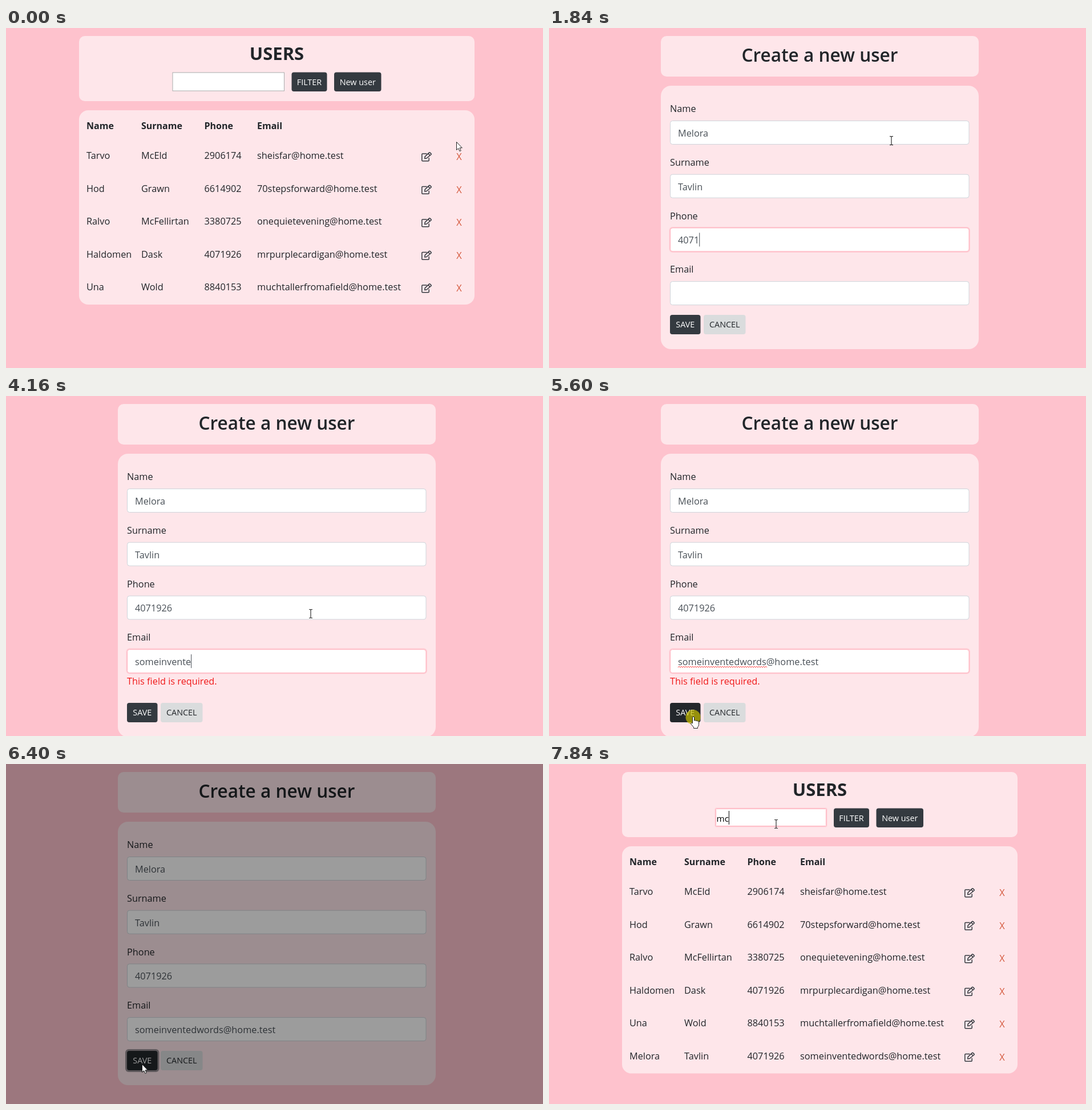
Animation of 941x595 px, one loop 8000 ms. Source, as an HTML page:

```html
<!DOCTYPE html>
<html lang="en">
<head>
<meta charset="utf-8">
<title>Users</title>
<style>
html, body { margin: 0; width: 100%; height: 100%; overflow: hidden; background: #fec2cd; }
svg { display: block; width: 100vw; height: 100vh; }
text { font: 16.3px "Open Sans", sans-serif; fill: #212529; white-space: pre; }
.head { font-weight: 700; font-size: 16px; }
.title { font-weight: 600; font-size: 31.6px; text-anchor: middle; }
.bold { font-weight: 700; font-size: 31px; }
.button { font-size: 14.4px; text-anchor: middle; }
.white { fill: #fff; }
.value { fill: #495057; }
.query { font-size: 15.2px; fill: #000; }
.error { fill: #f01818; }
.remove { fill: #d4573b; text-anchor: middle; }
.key { font: 700 70px "Liberation Sans", sans-serif; text-anchor: middle; fill: #000; }
</style>
</head>
<body>
<svg id="stage" viewBox="0 0 941 595"></svg>
<script>
const LOOP = 8000, STEP = 40, PITCH = 93.7, ERROR_HEIGHT = 35;
const stage = document.getElementById('stage');
const pen = document.createElement('canvas').getContext('2d');

const newUser = ['Melora', 'Tavlin', '4071926', 'someinventedwords@home.test'];
const users = [
  ['Tarvo', 'McEld', '2906174', 'sheisfar@home.test'],
  ['Hod', 'Grawn', '6614902', '70stepsforward@home.test'],
  ['Ralvo', 'McFellirtan', '3380725', 'onequietevening@home.test'],
  ['Haldomen', 'Dask', '4071926', 'mrpurplecardigan@home.test'],
  ['Una', 'Wold', '8840153', 'muchtallerfromafield@home.test'],
  newUser
];
const fields = ['Name', 'Surname', 'Phone', 'Email'];
const columns = [141, 237, 347.5, 440];

// Pointer: [time, x, y]
const path = [
  [40, 789, 199], [200, 615, 95], [280, 615, 95], [440, 621, 178],
  [1800, 621, 178], [2080, 242, 522], [2160, 242, 522], [2480, 534, 381],
  [5240, 534, 381], [5520, 253, 561], [5640, 253, 561], [5760, 238, 525],
  [7120, 238, 525], [7560, 398, 105]
];
const pointerKinds = [
  [0, 'arrow'], [160, 'hand'], [280, 'arrow'], [400, 'beam'], [1880, 'arrow'],
  [2040, 'hand'], [2200, 'arrow'], [2440, 'beam'], [5320, 'arrow'],
  [5440, 'hand'], [6240, 'arrow'], [7520, 'beam']
];
const clicks = [[200, 280], [400, 440], [2080, 2160], [2480, 2560], [5560, 5680], [6160, 6240], [7560, 7640]];
const focusTimes = [[0, -1], [440, 0], [720, 1], [1360, 2], [2120, -1], [2520, 2], [3160, 3], [5640, -1]];
const caretGaps = [[2600, 2760], [3400, 3560], [5240, 5640]];

const clamp = (v, lo, hi) => Math.min(hi, Math.max(lo, v));
const within = (t, [from, to]) => t >= from && t < to;
const latest = (list, t) => list.filter(([from]) => from <= t).pop()[1];
// Number of characters typed at an even pace; the first lands at `from`, the last at `to`.
const count = (t, from, to, n) => clamp(Math.floor((t - from) / (to - from) * (n - 1) + 1e-6) + 1, 0, n);

function width(string, size = 16.3) {
  pen.font = `${size}px "Open Sans", sans-serif`;
  return pen.measureText(string).width;
}

const text = (x, y, string, cls = '') => `<text x="${x}" y="${y}" class="${cls}">${string}</text>`;
const rect = (x, y, w, h, r, fill, extra = '') =>
  `<rect x="${x}" y="${y}" width="${w}" height="${h}" rx="${r}" fill="${fill}" ${extra}/>`;
const panel = (x, y, w, h, r) => rect(x, y, w, h, r, '#fee6ea');
const caret = (x, y, color) => rect(x, y, 1, 24, 0, color);

function button(x, y, w, h, label, fill, cls = 'white') {
  return rect(x, y, w, h, 4, fill) + text(x + w / 2, y + h / 2 + 5.4, label, 'button ' + cls);
}

function input(x, y, w, h, focused, border = '#ced4da', r = 4) {
  const glow = focused ? rect(x - 1, y - 1, w + 2, h + 2, r + 1, 'none', 'stroke="#ffb6c1" stroke-width="2" opacity=".5"') : '';
  return glow + rect(x, y, w, h, r, '#fff', `stroke="${focused ? '#ffb0bc' : border}"`);
}

function editIcon(x, y) {
  return `<path transform="translate(${x} ${y})" fill="none" stroke="#343a40" stroke-width="1.5" d="M.5-5.2H-7q-1.2 0-1.2 1.2V6.3q0 1.2 1.2 1.2H3q1.2 0 1.2-1.2V2M-3.2 3l.3-3.1L4.4-7.2q.8-.8 1.6 0l1.8 1.8q.8.8 0 1.6L-.1 2.7zM2.8-5.6l3.4 3.4"/>`;
}

function listPage(t, rowCount) {
  const focused = t >= 7600, shift = focused ? -1.5 : 0;
  const query = 'mc'.slice(0, count(t, 7800, 7840, 2));
  let out = panel(128, 14, 693, 114, 10) + panel(128, 144, 693, 52.5 + 57.5 * rowCount, 16)
    + text(474.5, 56, 'USERS', 'title bold')
    + (focused ? input(292.5, 78.5, 193, 30, true, '', 1) : input(292, 78, 195.5, 32, false, '#a9adad', 0))
    + button(500.5 + shift, 77.5, 62, 33.5, 'FILTER', '#343a40')
    + button(575 + shift, 77.5, 82.5, 33.5, 'New user', '#343a40');
  if (focused) out += text(293.5, 101, query, 'query') + caret(293.5 + width(query, 15.2), 82, '#000');
  fields.forEach((name, i) => out += text(columns[i], 177, name, 'head'));
  users.slice(0, rowCount).forEach((user, row) => {
    const y = 229.3 + 57.5 * row;
    user.forEach((value, i) => out += text(columns[i], y, value));
    out += editIcon(737, y - 4) + text(794, y + 2, 'X', 'remove');
  });
  return out;
}

function formPage(t, pointer) {
  const focus = latest(focusTimes, t);
  const lengths = [
    count(t, 480, 680, 6),
    count(t, 840, 920, 2) + count(t, 1080, 1200, 4),
    count(t, 1480, 1640, 4) + count(t, 2880, 3000, 3),
    count(t, 3560, 4280, 13) + count(t, 4400, 4520, 4) + count(t, 4680, 5080, 10)
  ];
  const errors = {};
  if (within(t, [2120, 3000])) errors[2] = 'Please enter a valid phone number';
  if (within(t, [2120, 5640])) errors[3] = 'This field is required.';
  const extra = ERROR_HEIGHT * Object.keys(errors).length;

  let out = panel(196, 14, 557, 71, 10) + panel(196, 101, 557, 461 + extra, 18)
    + text(474.5, 59, 'Create a new user', 'title');
  let offset = 0;
  fields.forEach((name, i) => {
    const y = PITCH * i + offset, value = newUser[i].slice(0, lengths[i]);
    out += text(212, 147.3 + y, name) + input(212.5, 162.5 + y, 523.5, 41, focus === i)
      + text(226, 190 + y, value, 'value');
    if (focus === i && !caretGaps.some(gap => within(t, gap)))
      out += caret(226 + width(value), 171 + y, '#495057');
    if (i === 3 && focus === 3 && value.includes('@')) {
      const waves = Math.round(width(value.split('@')[0]) / 4);
      out += `<path d="M226 ${194 + y}${'l2-2l2 2'.repeat(waves)}" fill="none" stroke="#f33"/>`;
    }
    if (errors[i]) {
      out += text(212, 223.5 + y, errors[i], 'error');
      offset += ERROR_HEIGHT;
    }
  });
  const y = 502 + extra;
  if (t >= 6160) out += rect(209, y - 3, 59.5, 40, 6, 'rgba(52,58,64,.5)');
  out += button(212, y, 53.5, 34, 'SAVE', pointer === 'hand' || t >= 6160 ? '#23272b' : '#343a40')
    + button(271, y, 73.5, 34, 'CANCEL', '#dadcdd', '');
  if (within(t, [520, 760])) out += keyBadge('melora'[lengths[0] - 1]);
  if (within(t, [1080, 1200])) out += keyBadge('l');
  return out;
}

// The letter is cut out of the white key cap.
function keyBadge(letter) {
  return `<mask id="cut">${rect(396, -10, 157, 110, 0, '#fff')}${text(475, 59, letter, 'key')}</mask>`
    + rect(396, -8, 157, 104, 4, '#000', 'opacity=".4"')
    + rect(430.5, -6, 89, 83, 6, '#fff', 'mask="url(#cut)"')
    + rect(443, 0, 77, 1, 0, '#998a8d');
}

function pointerPosition(t) {
  const next = path.findIndex(([time]) => time > t);
  if (next < 0) return path[path.length - 1].slice(1);
  if (next === 0) return path[0].slice(1);
  const [t0, x0, y0] = path[next - 1], [t1, x1, y1] = path[next];
  const p = (t - t0) / (t1 - t0), eased = p * p * (3 - 2 * p);
  return [x0 + (x1 - x0) * eased, y0 + (y1 - y0) * eased];
}

const pointerShapes = {
  arrow: '<path d="M.5.5V14.5L3.7 11.6L6 16.6L8.2 15.6L6 10.8H10.3z" fill="#fff" stroke="#222"/>',
  beam: '<path d="M-3-7.5H-1L0-6.5L1-7.5H3M0-6.5V6.5M-3 7.5H-1L0 6.5L1 7.5H3" fill="none" stroke="#333" stroke-width="1.2"/>',
  hand: '<path d="M-1.5 1q1.5-2 3 0v6q2-1 3 .5q2-1 3 .5q2-.5 2 1.5v4q0 3-2 5v2h-7v-2q-2-2-5-6q0-2 2-1.5l1 1z" fill="#fff" stroke="#222"/>'
};

function render(t) {
  const kind = latest(pointerKinds, t), [x, y] = pointerPosition(t);
  let out = rect(0, 0, 941, 595, 0, '#fec2cd');
  if (t < 280) out += listPage(t, 5);
  else if (t < 6760) out += formPage(t, kind);
  else out += listPage(t, 6);
  if (within(t, [6160, 6720]))
    out += rect(0, 0, 941, 595, 0, '#000', `opacity="${0.39 * clamp((t - 6160) / 160, 0, 1)}"`);
  if (clicks.some(click => within(t, click)))
    out += `<circle cx="${x - 0.5}" cy="${y + 1}" r="13" fill="#c8be00" opacity=".7"/>`;
  return out + `<g transform="translate(${x} ${y})">${pointerShapes[kind]}</g>`;
}

let shown = -1;
function frame() {
  const now = performance.now() % LOOP, t = now - now % STEP;
  if (t !== shown) stage.innerHTML = render(shown = t);
  requestAnimationFrame(frame);
}
frame();
</script>
</body>
</html>
```
